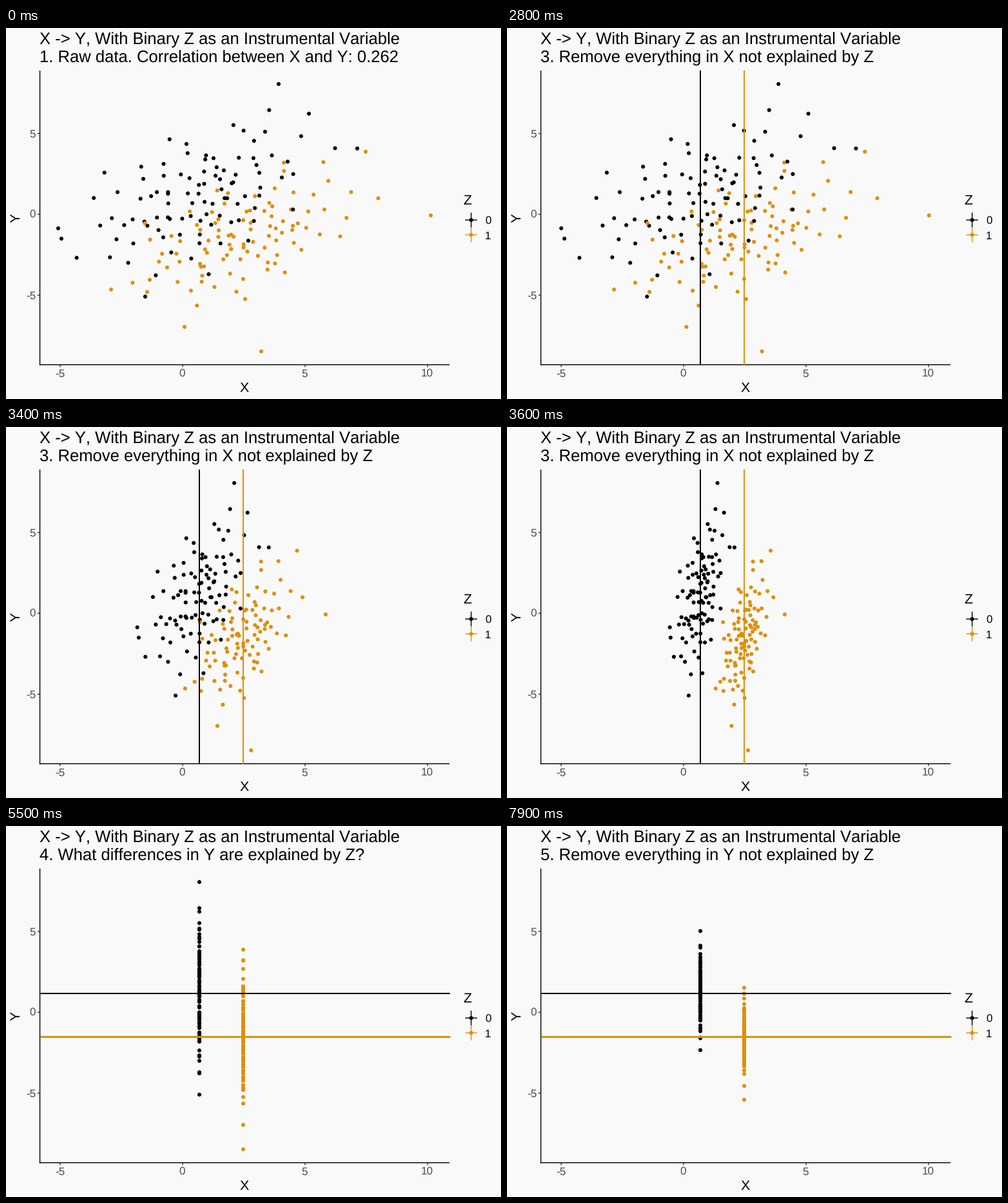
A matplotlib script for the animation above (8000 ms loop, 768 px wide and 576 px high).

```python
import numpy as np
import matplotlib.pyplot as plt
from matplotlib.animation import FuncAnimation

W, H, DPI = 768, 576, 96
PT = 72 / DPI                      # one pixel in points
BLACK, ORANGE, GREY, PAPER = "#000000", "#DE8F0B", "#4D4D4D", "#F9F9F9"
TICK = "#333333"
LEFT, RIGHT, TOP, BOTTOM = 52.57, 688.13, 66.07, 522.76
STEP = 100                         # ms per frame
FRAMES = 80
STEPS = 13                         # length of one collapse, in frames
MEAN_X = (300, 368)
MEAN_Y = (260, 326.5)
COLORS = (BLACK, ORANGE)

plt.rcParams.update({
    "font.family": "Liberation Sans",
    "text.kerning_factor": 6,
    "text.hinting": "none",
})

SUBTITLES = [
    (0, "1. Raw data. Correlation between X and Y: 0.262"),
    (5, "2. What differences in X are explained by Z?"),
    (28, "3. Remove everything in X not explained by Z"),
    (51, "4. What differences in Y are explained by Z?"),
    (74, "5. Remove everything in Y not explained by Z"),
]

# The extreme points of each group, in pixels
EXTREMES = (
    [(423, 87), (470, 133), (545, 187), (81, 311), (86, 327), (216, 417)],
    [(558, 192), (659, 291), (396, 502), (277, 464), (163, 406), (431, 209)],
)
SPREAD = ((86, 60), (84, 51))      # deviation in x and y per group
CORR = 0.5


def group(k, rng, size=100):
    """Extremes plus an evenly filled, correlated normal cloud."""
    n = size - len(EXTREMES[k])
    radius = np.sqrt(-2 * np.log(np.linspace(0.05, 0.99, n)))
    angle = np.pi * (3 - np.sqrt(5)) * np.arange(n)
    noise = rng.normal(0, 0.12, (2, n))
    a, b = radius * np.array([np.cos(angle), np.sin(angle)]) + noise
    sx, sy = SPREAD[k]
    x = MEAN_X[k] + sx * a
    y = MEAN_Y[k] - sy * (CORR * a + np.sqrt(1 - CORR ** 2) * b)
    return np.vstack([EXTREMES[k], np.column_stack([x, y])])


rng = np.random.default_rng(7)
points = np.vstack([group(0, rng), group(1, rng)])
z = np.repeat([0, 1], 100)
order = rng.permutation(len(z))
points, z = points[order], z[order]
center = np.column_stack([np.take(MEAN_X, z), np.take(MEAN_Y, z)])

fig = plt.figure(figsize=(W / DPI, H / DPI), dpi=DPI, facecolor=PAPER)
ax = fig.add_axes([0, 0, 1, 1])
ax.set(xlim=(0, W), ylim=(H, 0))
ax.axis("off")


def label(x, y, text, px, color=BLACK, **kw):
    return ax.text(x, y, text, fontsize=px * PT, color=color,
                   va="baseline", **kw)


def line(x0, y0, x1, y1, color=BLACK, px=1.42, z=1, snap=False):
    return ax.plot([x0, x1], [y0, y1], color=color, lw=px * PT,
                   solid_capstyle="butt", zorder=z, snap=snap)[0]


def dots(xy, colors):
    return ax.scatter(*np.transpose(xy), s=(6.1 * PT) ** 2, c=colors,
                      linewidths=0, zorder=2)


# Axes
line(LEFT, TOP, LEFT, BOTTOM + 0.7)
line(LEFT - 0.7, BOTTOM, RIGHT, BOTTOM)
for value in (-5, 0, 5, 10):
    x = 274 + 38 * value
    line(x, BOTTOM, x, BOTTOM + 3.67, TICK)
    label(x - 0.5, 542, str(value), 17.07, GREY, ha="center")
for value in (-5, 0, 5):
    y = 289.2 - 25.1 * value
    line(LEFT - 3.67, y, LEFT, y, TICK)
    label(46, y + 6, str(value), 17.07, GREY, ha="right")
label(370, 565, "X", 21.33, ha="center")
label(22, 295, "Y", 21.33, ha="center", rotation=90, rotation_mode="anchor")

# Legend
KEY_X, KEY = 721.65, 23.04
label(709.5, 274, "Z", 21.33)
for i, color in enumerate(COLORS):
    y = 298.12 + KEY * i
    line(KEY_X - 0.4 * KEY, y, KEY_X + 0.4 * KEY, y, color)
    line(KEY_X, y - KEY / 2, KEY_X, y + KEY / 2, color)
    label(743, y + 7.2, str(i), 17.07)
dots([(KEY_X, 298.12), (KEY_X, 298.12 + KEY)], COLORS)

# Moving parts
label(52, 26, "X -> Y, With Binary Z as an Instrumental Variable", 25.6)
subtitle = label(52, 54, "", 25.6)
cloud = dots(points, np.where(z == 0, *COLORS))
v_lines = [line(x, TOP, x, BOTTOM, c, 2, 3, True)
           for x, c in zip(MEAN_X, COLORS)]
h_lines = [line(LEFT, y, RIGHT + 0.5, y, c, px, 3, True)
           for y, c, px in zip(MEAN_Y, COLORS, (2, 3))]


def spread(frame, start):
    """Share of the spread that is left: 1 before the collapse, 0 after."""
    t = np.clip((frame - start) / STEPS, 0, 1)
    return (1 + np.cos(np.pi * t)) / 2


def draw(frame):
    subtitle.set_text([s for first, s in SUBTITLES if first <= frame][-1])
    scale = np.array([spread(frame, 27), spread(frame, 73)])
    cloud.set_offsets(center + (points - center) * scale)
    for item in v_lines:
        item.set_visible(9 <= frame < 51)
    for item in h_lines:
        item.set_visible(frame >= 55)
    return [subtitle, cloud, *v_lines, *h_lines]


anim = FuncAnimation(fig, draw, frames=FRAMES, interval=STEP, repeat=True,
                     repeat_delay=0, blit=False)
plt.show()
```
